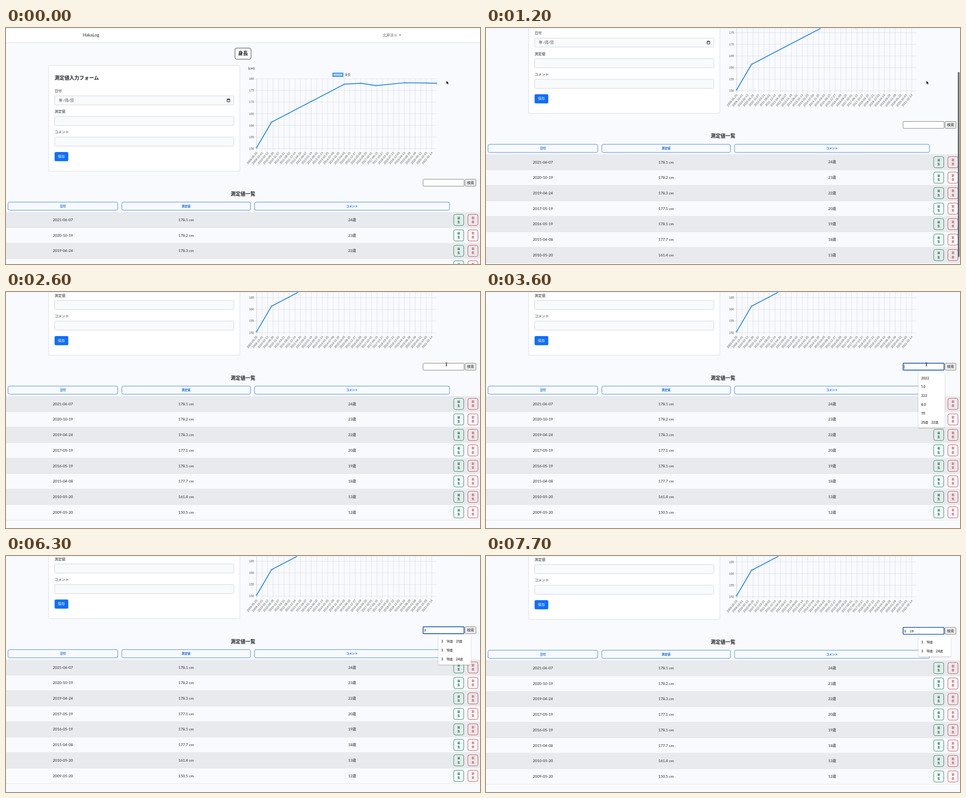
These frames come from a looping animation (1058 px wide and 529 px high, 8 s). An HTML page:

```html
<!DOCTYPE html>
<html lang="ja">
<head>
<meta charset="utf-8">
<title>測定値一覧</title>
<style>
html, body { margin: 0; width: 100%; height: 100%; overflow: hidden; background: #f8fafd; }
svg { display: block; width: 100%; height: 100%; font-family: Lato, "Noto Sans CJK JP", sans-serif; }
.axis { font-family: "Liberation Sans", "Noto Sans CJK JP", sans-serif; }
.menu { font-family: Inter, "Noto Sans CJK JP", sans-serif; font-weight: 500; }
text { white-space: pre; }
</style>
</head>
<body>
<svg id="stage" viewBox="0 0 1058 529">
  <defs>
    <filter id="navShadow" x="-5%" y="-20%" width="110%" height="160%">
      <feDropShadow dx="0" dy="1" stdDeviation="1" flood-opacity=".1"/>
    </filter>
    <filter id="menuShadow" x="-20%" y="-20%" width="140%" height="140%">
      <feDropShadow dx="0" dy="1" stdDeviation="1.2" flood-opacity=".35"/>
    </filter>
  </defs>
  <g id="page"></g>
  <rect width="1058" height="1" fill="#e4e6e9"/>
  <rect id="thumb" x="1053" width="4" height="415" rx="2" fill="#6d6f72"/>
  <path id="arrow" d="M983 118v8l1.9-1.6 1.3 2.9 1.4-.6-1.3-2.8h2.4z" fill="#000" stroke="#fff" stroke-width=".6"/>
  <path id="beam" d="M981 158.500q2 0 2 1.200v5.100q0 1.200-2 1.200M985 158.500q-2 0-2 1.200v5.100q0 1.200 2 1.200M981.900 163.300h2.200" fill="none" stroke="#111" stroke-width=".8"/>
</svg>
<script>
const $ = id => document.getElementById(id);
const page = $('page');
const INK = '#212529', BLUE = '#0d6efd', LINE = '#0b78ea', FIELD = '#f8fafc';

function add(tag, attrs, parent = page) {
  const el = document.createElementNS('http://www.w3.org/2000/svg', tag);
  for (const key in attrs) el.setAttribute(key, attrs[key]);
  return parent.appendChild(el);
}
function box(x, y, right, bottom, fill, stroke = 'none', rx = 3, parent = page, extra = {}) {
  return add('rect', { x, y, width: right - x, height: bottom - y, fill, stroke, rx, ...extra }, parent);
}
// y is the vertical middle of the text
function label(str, x, y, size, attrs = {}, parent = page) {
  const el = add('text', { x, y: y + size * .36, 'font-size': size, fill: INK, ...attrs }, parent);
  el.textContent = str;
  return el;
}
const mid = { 'text-anchor': 'middle' };
const bold = { 'font-weight': 700 };

// Navigation bar and page title
box(-5, -5, 1063, 32, '#fff', 'none', 0, page, { filter: 'url(#navShadow)' });
label('HakaLog', 171.5, 16, 9.6);
label('北原涼斗', 841, 16, 8, { fill: '#666' });
add('path', { d: 'M877 14.700h5l-2.500 2.600z', fill: '#555' });
box(511, 45, 547, 70, '#f8f9fa', '#343a40', 4);
label('身長', 529, 57.5, 11, { ...mid, ...bold });

// Entry form
box(95, 84, 522, 321, '#fff', '#d8dadd');
label('測定値入力フォーム', 108.5, 112, 11, bold);
['日付', '測定値', 'コメント'].forEach((name, i) => {
  const y = 152 + i * 46.2;
  label(name, 108.5, y - 11, 8, { 'font-weight': 500 });
  box(108.5, y, 508.5, y + 20.4, FIELD, '#ced4da');
});
label('年 /月/日', 118, 161.8, 8);
add('path', { d: 'M493.500 159.500h6v6h-6zM493.500 160.300h6M495 158v1.500M498 158v1.500', fill: 'none', stroke: '#111' });
box(108.5, 278, 139, 298.5, BLUE);
label('保存', 123.7, 288, 8, { ...mid, fill: '#fff' });

// Records, newest first
const records = [
  ['2021-06-07', 178.1, 24], ['2020-10-19', 178.2, 23], ['2019-04-24', 178.3, 22], ['2017-05-19', 177.1, 20],
  ['2016-05-19', 178.1, 19], ['2015-04-08', 177.7, 18], ['2010-05-20', 161.4, 13], ['2009-05-20', 150.5, 12]
];

// Chart
const DAY = 864e5, first = Date.parse('2009-05-20');
const total = (Date.parse('2021-06-07') - first) / DAY;
const dayX = d => 559.5 + 401 * d / total;
const cmY = v => 270.5 - (v - 150) * 5.22;
const chart = add('g', { class: 'axis' });
const axisInk = { fill: '#555' };

label('(cm)', 540.5, 90, 8);
box(729.8, 101.2, 752, 108.4, '#a9d3f7', LINE, 0, chart, { 'stroke-width': 1.7 });
label('身長', 756, 104.8, 6.6, axisInk, chart);
for (let v = 150; v <= 180; v += 5) {
  const y = cmY(v);
  add('path', { d: `M555 ${y}H961`, stroke: '#dadcdf', 'stroke-width': .8 }, chart);
  label(v, 553.5, y, 6.6, { ...axisInk, 'text-anchor': 'end' }, chart);
}
for (let d = 0; d < total; d += 134) {
  const x = dayX(d);
  add('path', { d: `M${x} 113.900V274.500`, stroke: d ? '#dadcdf' : '#c4c6c9', 'stroke-width': .8 }, chart);
  label(new Date(first + d * DAY).toISOString().slice(0, 10), 0, 0, 6.6,
    { ...axisInk, 'text-anchor': 'end', transform: `translate(${x + .5} 278.500) rotate(-50)` }, chart);
}
const points = records.map(([date, cm]) => [dayX((Date.parse(date) - first) / DAY), cmY(cm)]);
add('polyline', { points: points.join(' '), fill: 'none', stroke: LINE, 'stroke-width': 1.7, 'stroke-linejoin': 'round' }, chart);
points.forEach(([cx, cy]) => add('circle', { cx, cy, r: 1.6, fill: '#9accf5', stroke: LINE, 'stroke-width': .7 }, chart));

// Search
const field = box(931, 339, 1022.4, 354.5, '#fff', '#767676', 1.5);
box(1024.7, 339, 1049, 354.5, '#efefef', '#767676', 1.5);
label('検索', 1037, 346.8, 8, mid);
const query = label('', 933, 346.8, 8, { class: 'axis', fill: '#000' });
const caret = add('rect', { y: 342.3, width: .8, height: 9.4, fill: '#000' });

// Table
label('測定値一覧', 529, 372, 11, { ...mid, ...bold });
[['日付', 4.5, 249.5], ['測定値', 258.5, 545.7], ['コメント', 554.7, 990]].forEach(([name, x, right]) => {
  box(x, 390.2, right, 408.4, FIELD, '#3b82dc', 3.5);
  label(name, (x + right) / 2, 399.2, 6.5, { ...mid, ...bold, fill: '#0f66e0' });
});
const ROW = 34.72;
records.forEach(([date, cm, age], i) => {
  const top = 412.7 + i * ROW, y = top + 17.3;
  if (i % 2 === 0) box(0, top, 1058, top + ROW, '#e8eaed', 'none', 0);
  add('path', { d: `M0 ${top + ROW}H1058`, stroke: '#dcdfe3', 'stroke-width': .8 });
  label(date, 127, y, 8.35, mid);
  label(cm.toFixed(1) + ' cm', 402, y, 8.35, mid);
  label(age + '歳', 772.5, y, 8.2, mid);
  [['編集', 999.3, '#198754'], ['削除', 1031, '#cf4250']].forEach(([name, x, color]) => {
    box(x, top + 5, x + 22.4, top + 30, 'none', color, 4);
    [...name].forEach((ch, n) => label(ch, x + 11.2, top + 12.8 + n * 9.2, 5.6, { ...mid, ...bold, fill: color }));
  });
});

const menu = add('g', { class: 'menu' });

function showMenu(items, right) {
  menu.replaceChildren();
  if (!items) return;
  const frame = add('g', { filter: 'url(#menuShadow)' }, menu);
  box(965, 360, right, 364.6 + items.length * 19.8, '#fff', 'none', 2.5, frame);
  add('path', { d: 'M972.500 360.500l4.500-3.500 4.500 3.500z', fill: '#fff' }, frame);
  items.forEach((item, i) => label(item, 971.5, 372.3 + i * 19.8, 7, { fill: '#111' }, menu));
}

const recent = ['2022', '1.0', '222', '6.0', '111', '25歳　22歳'];
const threes = ['3 6', '3　14歳　21歳', '3 9', '3', '3 4', '3 4　21歳'];
const ones = ['3　14歳　21歳', '3　19歳', '3　19歳　24歳'];
const states = [
  { at: 0, scroll: 0, pointer: 'arrow' },
  { at: 500, scroll: 65, pointer: 'arrow', bar: true },
  { at: 1200, scroll: 129.5, pointer: 'arrow', bar: true },
  { at: 1900, scroll: 179.6, pointer: 'arrow', bar: true },
  { at: 2600, scroll: 179.3, pointer: 'beam' },
  { at: 3600, scroll: 179.3, pointer: 'beam', typed: '', caretX: 933, items: recent, right: 1024 },
  { at: 5600, scroll: 180, typed: '3', items: threes, right: 1031 },
  { at: 6300, scroll: 180.4, typed: '3　', items: ones, right: 1037.5 },
  { at: 7000, scroll: 181, typed: '3　1', caretX: 950, items: ones, right: 1037.5 },
  { at: 7700, scroll: 179, typed: '3　19', items: ones.slice(1), right: 1037.5 }
];
const show = (el, on) => el.setAttribute('visibility', on ? 'visible' : 'hidden');

function apply(s) {
  const focused = s.typed !== undefined;
  page.setAttribute('transform', `translate(0 ${-s.scroll})`);
  $('thumb').setAttribute('y', s.scroll * .76);
  show($('thumb'), s.bar);
  show($('arrow'), s.pointer === 'arrow');
  show($('beam'), s.pointer === 'beam');
  field.setAttribute('stroke', focused ? '#0f4fae' : '#767676');
  field.setAttribute('stroke-width', focused ? 1.7 : 1);
  query.textContent = s.typed || '';
  caret.setAttribute('x', s.caretX || 0);
  show(caret, s.caretX);
  showMenu(s.items, s.right);
}

const LOOP = 8000, start = performance.now();
let current;
function tick() {
  const t = (performance.now() - start) % LOOP;
  const next = states.findLast(s => s.at <= t);
  if (next !== current) apply(current = next);
  requestAnimationFrame(tick);
}
tick();
</script>
</body>
</html>
```
